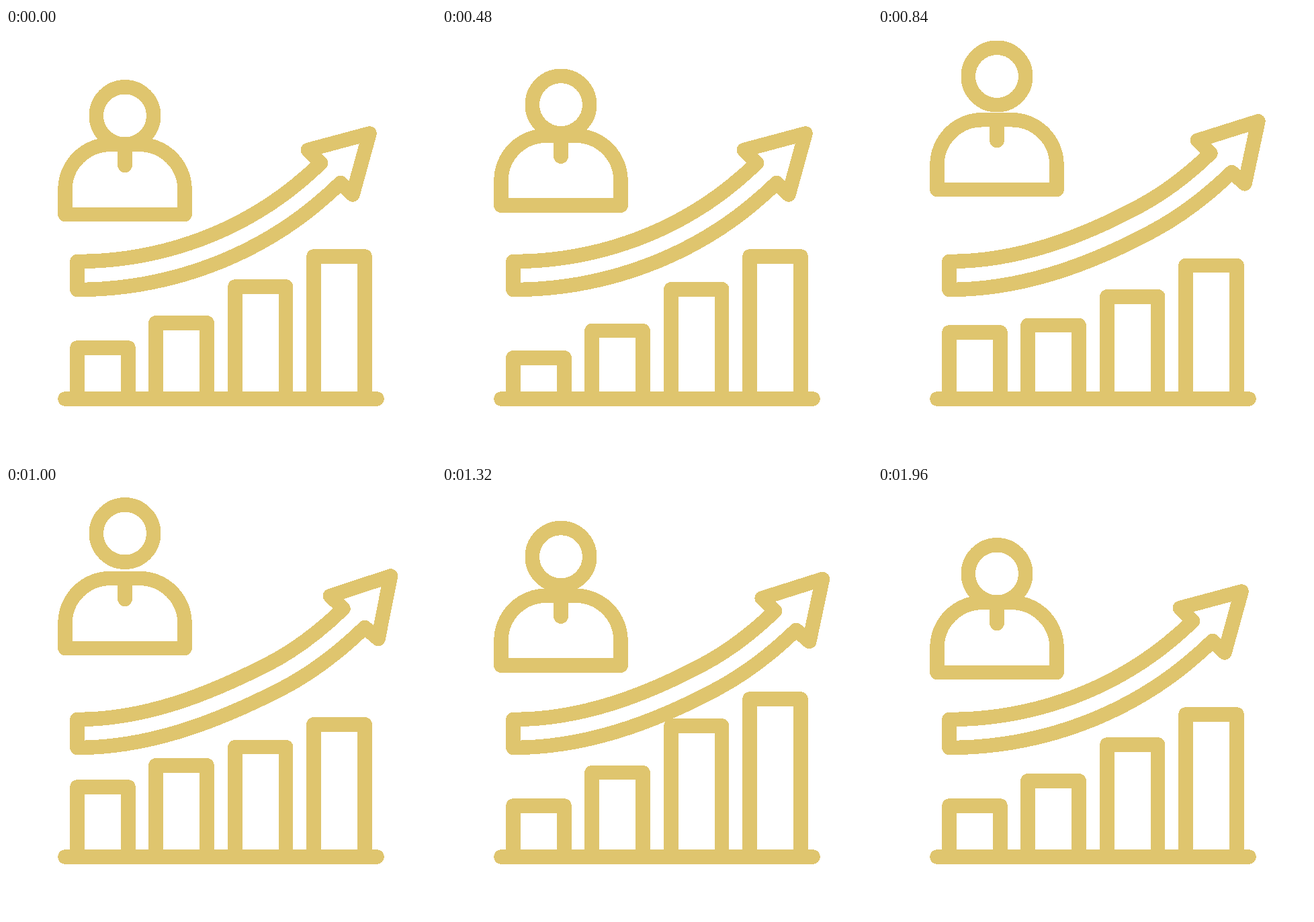
An HTML page for the animation above (2080 ms loop, 640x640 px).

```html
<!DOCTYPE html>
<html lang="en">
<head>
<meta charset="utf-8">
<title>Growth chart</title>
<style>
  html, body { margin: 0; width: 100%; height: 100%; overflow: hidden; background: #fff; }
  svg { display: block; width: 100vw; height: 100vh; }
  svg * {
    fill: none; stroke: #dfc56e; stroke-width: 21.5;
    stroke-linecap: round; stroke-linejoin: round; shape-rendering: crispEdges;
  }
</style>
</head>
<body>
<svg viewBox="0 0 640 640">
  <g id="bars"></g>
  <path d="M88 552H552"/>
  <path id="arrow"/>
  <g id="body">
    <path d="M88 277.5V240.5A67 67 0 0 1 155 173.5H199A67 67 0 0 1 266 240.5V277.5Z"/>
    <path d="M177 173.5V204.5"/>
  </g>
  <circle id="head" cx="177" cy="130.5" r="42.7"/>
</svg>
<script>
const LOOP = 2080, STEP = 40, LAST = 1960;
const $ = id => document.getElementById(id);

// Keys are [time, value], eased in and out between neighbours.
const BAR = [[20, 0], [440, 14.8], [560, 14.8], [925, -29], [960, -29], [1320, 0]];
const HEAD = [[260, 0], [900, -60], [990, -60], [1587, 0]];
const BODY = [[265, 0], [795, -36.8], [950, -36.8], [1530, 1], [1700, 1], [1900, 0]];
const ARROW = [[530, 0], [970, 1], [1160, 1], [1730, 0]];

const bars = [
  { left: 106, right: 182, top: 476 },
  { left: 223, right: 299, top: 438.8 },
  { left: 341, right: 416.7, top: 385 },
  { left: 458, right: 534, top: 340 }
];
const BAR_DELAY = 160;
for (const bar of bars) {
  bar.el = document.createElementNS("http://www.w3.org/2000/svg", "path");
  $("bars").append(bar.el);
}

const mix = (a, b, p) => a + (b - a) * p;

function track(keys, t) {
  if (t <= keys[0][0]) return keys[0][1];
  for (let i = 1; i < keys.length; i++) {
    const [t0, v0] = keys[i - 1], [t1, v1] = keys[i];
    if (t < t1) {
      const u = (t - t0) / (t1 - t0);
      return mix(v0, v1, u * u * (3 - 2 * u));
    }
  }
  return keys[keys.length - 1][1];
}

// Cubic from a to b that rises at the given angles (degrees) at its ends.
function curve(a, angA, b, angB) {
  const len = Math.hypot(b[0] - a[0], b[1] - a[1]) * 0.34;
  const along = (pt, ang, k) => {
    const r = ang * Math.PI / 180;
    return [pt[0] + k * Math.cos(r), pt[1] - k * Math.sin(r)];
  };
  const back = angA > 90 ? 1 : 0;
  return `C${along(a, angA, len)} ${along(b, angB, -len)} ${b}`;
}

function arrowPath(p) {
  const at = (x, y, dx, dy) => [x + dx * p, y + dy * p];
  const start = [106, 347.5], end = [106, 389.5];
  const bend = mix(33, 27, p);
  const midTop = at(390, 264, 0, 1), midLow = at(413, 299, -4, 3.5);
  const notchTop = at(468.5, 201, 33.5, -18.5), notchLow = at(498, 230.5, 36, -20);
  const barbTop = at(449.5, 181.5, 33, -18), barbLow = at(516, 248, 38, -20.5);
  const tip = at(541, 157, 31.5, -23);
  return `M${start}` + curve(start, 0, midTop, bend) + curve(midTop, bend, notchTop, 44) +
    `L${barbTop}L${tip}L${barbLow}L${notchLow}` +
    curve(notchLow, 224, midLow, 180 + bend) + curve(midLow, 180 + bend, end, 180) + "Z";
}

function draw(t) {
  bars.forEach((bar, i) => {
    const top = bar.top + track(BAR, t - i * BAR_DELAY);
    bar.el.setAttribute("d", `M${bar.left} 552V${top}H${bar.right}V552`);
  });
  $("arrow").setAttribute("d", arrowPath(track(ARROW, t)));
  $("body").setAttribute("transform", `translate(0 ${track(BODY, t)})`);
  $("head").setAttribute("transform", `translate(0 ${track(HEAD, t)})`);
}

const origin = performance.now();
function tick() {
  const t = Math.max(0, performance.now() - origin) % LOOP;
  draw(Math.min(LAST, Math.floor(t / STEP) * STEP));
  requestAnimationFrame(tick);
}
tick();
</script>
</body>
</html>
```
